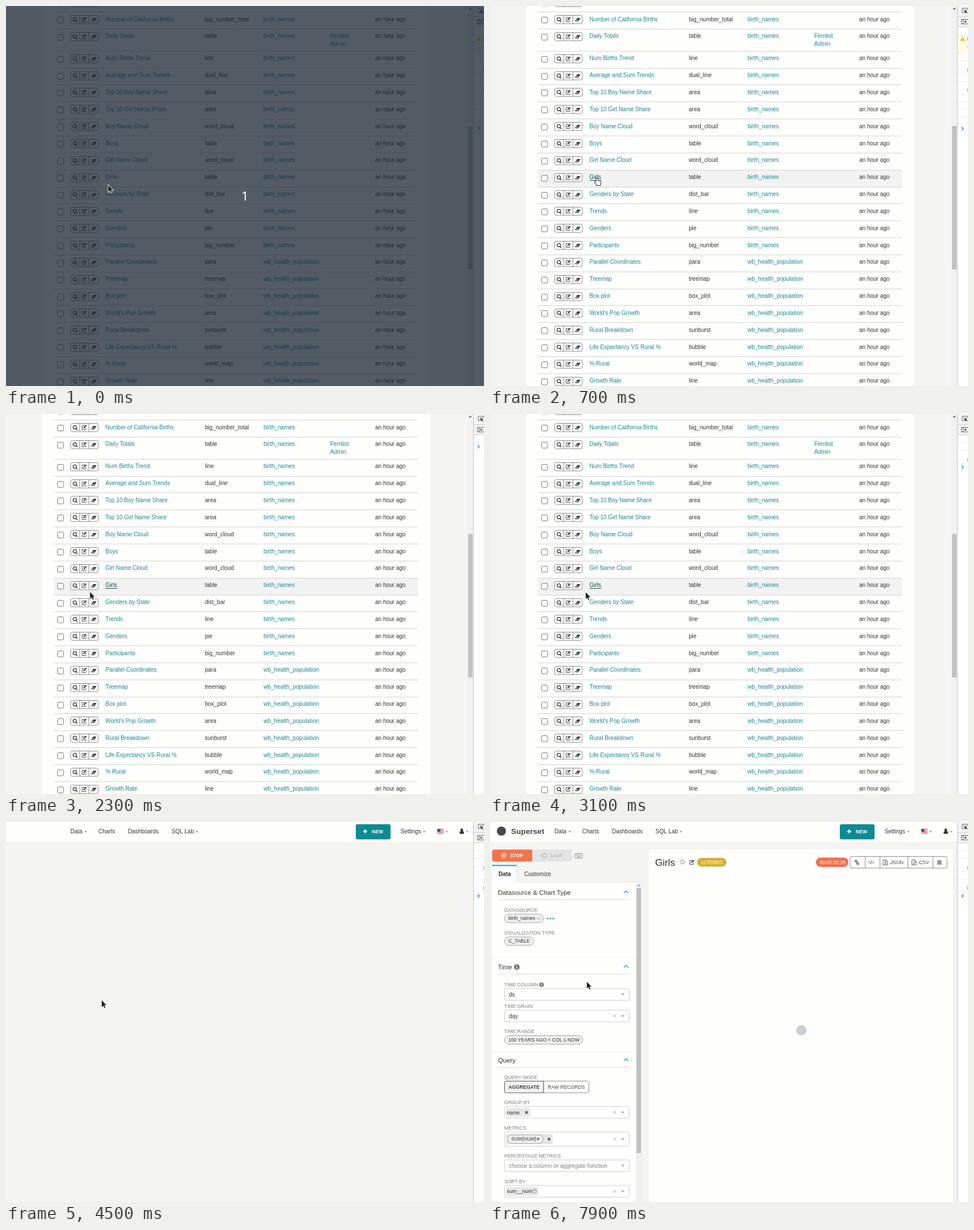
Write an HTML page with a canvas that moves like this. It is 839x668 px and loops after 8 s.

```html
<!DOCTYPE html>
<html lang="en">
<head>
<meta charset="utf-8">
<title>Chart list to explore view</title>
<style>
html, body { margin: 0; width: 100%; height: 100%; overflow: hidden; background: #fff; }
canvas { display: block; }
</style>
</head>
<body>
<canvas id="stage" width="839" height="668"></canvas>
<script>
const ctx = document.getElementById('stage').getContext('2d');
const LOOP = 8000, SANS = '"Liberation Sans", Arial, sans-serif';
const INK = '#333', TEAL = '#1f858f', BRIGHT = '#1fa8b8', WHITE = '#fefefd', PAGE = '#f4f4f3', MUTED = '#7d7d7d';
const SMALL = 8.57;

function text(str, x, y, color = INK, size = 10, weight = '') {
  ctx.font = `${weight} ${size}px ${SANS}`;
  ctx.fillStyle = color;
  ctx.fillText(str, x, y + size * .35);
}
function rect(x, y, w, h, fill) {
  ctx.fillStyle = fill;
  ctx.fillRect(x, y, w, h);
}
function box(x, y, w, h, r, fill, stroke, width = 1) {
  ctx.beginPath();
  ctx.roundRect(x, y, w, h, r);
  if (fill) { ctx.fillStyle = fill; ctx.fill(); }
  if (stroke) { ctx.strokeStyle = stroke; ctx.lineWidth = width; ctx.stroke(); }
}
function dot(x, y, r, fill) {
  ctx.beginPath();
  ctx.arc(x, y, r, 0, 7);
  ctx.fillStyle = fill;
  ctx.fill();
}
// Path data drawn relative to (x, y).
function path(d, x, y, { fill, stroke, width = 1 }) {
  const p = new Path2D(d);
  ctx.save();
  ctx.translate(x, y);
  if (stroke) { ctx.strokeStyle = stroke; ctx.lineWidth = width; ctx.stroke(p); }
  if (fill) { ctx.fillStyle = fill; ctx.fill(p); }
  ctx.restore();
}
const caret = (x, y, s = 3, color = '#aaa') => path(`M${-s} ${-s / 2}H${s}L0 ${s / 2 + .5}Z`, x, y, { fill: color });
const pencil = (x, y) => {
  path('M2 -3.5H-3.5V3.5H3V1', x, y, { stroke: '#555' });
  path('M-1.5 1.5L-1 -.5L3.2 -4.4L4.7 -3L.5 1Z', x, y, { fill: '#444' });
};
const mix = (a, b, f) => `rgb(${a.map((v, i) => Math.round(v + (b[i] - v) * f))})`;
// Latest entry whose start time has been reached.
const at = (keys, t) => keys.findLast(k => k[0] <= t);

// ---- chart list ----
const BIRTHS = 'birth_names', HEALTH = 'wb_health_population';
const charts = [
  ['', ''], ['Number of California Births', 'big_number_total'], ['Daily Totals', 'table'],
  ['Num Births Trend', 'line'], ['Average and Sum Trends', 'dual_line'],
  ['Top 10 Boy Name Share', 'area'], ['Top 10 Girl Name Share', 'area'],
  ['Boy Name Cloud', 'word_cloud'], ['Boys', 'table'], ['Girl Name Cloud', 'word_cloud'],
  ['Girls', 'table'], ['Genders by State', 'dist_bar'], ['Trends', 'line'], ['Genders', 'pie'],
  ['Participants', 'big_number'], ['Parallel Coordinates', 'para'], ['Treemap', 'treemap'],
  ['Box plot', 'box_plot'], ["World's Pop Growth", 'area'], ['Rural Breakdown', 'sunburst'],
  ['Life Expectancy VS Rural %', 'bubble'], ['% Rural', 'world_map'], ['Growth Rate', 'line'],
];

function rowTools(y) {
  box(90.5, y - 3.5, 10.5, 10.5, 2, '#fff', '#777');
  box(113.5, y - 6.5, 48.5, 14.5, 3, '#fff', '#8c8c8c');
  rect(129, y - 6, 1, 14, '#8c8c8c');
  rect(145, y - 6, 1, 14, '#8c8c8c');
  path('M2.4 -.6A3 3 0 1 1 -3.6 -.6A3 3 0 1 1 2.4 -.6M1.5 1.6L4 4.2', 121.3, y + 1, { stroke: '#333', width: 1.4 });
  pencil(137, y + 1);
  path('M-5 3L-1 -3H5L1 3Z', 154, y + 1, { fill: '#444' });
  path('M-3 1.8L-2 .4H.8L-.2 1.8Z', 154, y + 1, { fill: '#fff' });
}

function chartList(t) {
  rect(0, 0, 821, 668, PAGE);
  rect(63, 0, 682, 668, WHITE);
  charts.forEach(([name, type], i) => {
    const y = i < 3 ? 23 + (i - 1) * 29.9 : 91.8 + (i - 3) * 29.84;
    const top = Math.round(y - 13);
    const girls = name === 'Girls';
    if (girls && t >= 100) rect(84, top, 639, 30, '#f2f2f2');
    rect(84, top, 639, 1, '#d3d3d3');
    rowTools(Math.round(y));
    if (!name) return;
    const focused = girls && t >= 600;
    text(name, 174.5, y, focused ? '#10484e' : TEAL);
    if (focused) rect(174.5, Math.round(y + 5), 20.5, 1, '#10484e');
    text(type, 349, y);
    text(i < 15 ? BIRTHS : HEALTH, 452, y, TEAL);
    if (i === 2) {
      text('Fernlist', 569, y, TEAL);
      text('Admin', 569, y + 13.5, TEAL);
    }
    text('an hour ago', 648, y);
  });
  rect(810, 0, 10, 668, '#f1f1f1');
  rect(811, 211, 8, 252, '#c1c1c1');
  path('M-2.5 1.5H2.5L0 -1.5Z', 815, 4.5, { fill: '#555' });
}

// ---- console strip ----
// start, prompt y, separators, clipped message marks
const consoleStates = [
  [0, 215.5, [50, 83, 96, 119, 132, 155, 168, 181, 194, 207], [58, 112, 148]],
  [1600, 44, [], []],
  [2100, 57.5, [50], []],
  [3000, 71, [50, 64], []],
  [3100, 93.5, [50, 64, 86], [80]],
  [4300, 106.5, [50, 64, 86, 100], [80]],
  [4500, 130, [50, 64, 86, 100, 122], [80, 116]],
];

function consoleStrip(t) {
  const [start, prompt, lines, marks] = at(consoleStates, t);
  rect(820, 0, 19, 668, '#fff');
  rect(821, 0, 18, 37, '#f3f3f3');
  if (!start) {
    rect(821, 50, 18, 33, '#fffbe3');
    path('M0 -4L4.3 3.7H-4.3Z', 829.5, 57.5, { fill: '#e8b62c' });
    rect(829, 56, 1, 3, '#fff');
    rect(838, 71, 1, 2, '#d9a93a');
  }
  lines.forEach(y => rect(821, y, 18, 1, '#ededed'));
  marks.forEach(y => rect(838, y - 3, 1, 6, '#999'));
  rect(821, 18, 18, 1, '#ccc');
  rect(821, 36, 18, 1, '#ccc');
  rect(820, 0, 1, 668, '#c4c4c4');
  path('M3 3.5H-4V-4H5V-1', 833, 8, { stroke: '#666' });
  path('M-1 -1L5 1.4L2.8 2.4L5.5 5L4.6 5.8L2 3.2L1 5Z', 833, 7.5, { fill: '#444' });
  box(827.5, 23.5, 12, 8, 0, null, '#666');
  rect(830, 24, 1, 8, '#666');
  path('M0 -2.5L4 0L0 2.5Z', 833, 27.5, { fill: '#555' });
  path('M-1.6 -2.8L1.3 0L-1.6 2.8', 829.5, prompt, { stroke: '#3b7fd0', width: 1.4 });
}

// ---- explore view ----
function navBar() {
  rect(0, 0, 820, 668, PAGE);
  rect(0, 0, 820, 35, WHITE);
  [['Data', 113, 140], ['Charts', 162], ['Dashboards', 214], ['SQL Lab', 290.5, 335], ['Settings', 692.5, 734]]
    .forEach(([label, x, arrow]) => {
      text(label, x, 16.5);
      if (arrow) caret(arrow, 17, 2.3, '#999');
    });
  box(614, 4, 61, 26.5, 3, '#0d8b93');
  path('M-3.5 0H3.5M0 -3.5V3.5', 630.5, 16.5, { stroke: '#fff', width: 2 });
  text('NEW', 642, 16.8, '#fff', SMALL, 'bold');
  for (let i = 0; i < 7; i++) rect(757, 12 + i * 1.2, 11, 1.2, i % 2 ? '#f6e5e5' : '#cf5560');
  rect(757, 12, 5.5, 4.8, '#454a82');
  caret(773.5, 17, 2.3, '#999');
  dot(800, 14, 2.4, INK);
  box(796.2, 16, 7.6, 4.8, [2.4, 2.4, 1, 1], INK);
  caret(809.5, 17, 2.3, '#999');
}

function section(title, y) {
  text(title, 14, y, INK, 11.4);
  path('M-4 2L0 -2L4 2', 239, y - 1, { stroke: BRIGHT, width: 1.4 });
  rect(14, y + 12, 231, 1, '#ddd');
}
const label = (str, y) => text(str, 25, y, MUTED, SMALL);
function pill(str, x, y, w) {
  box(x + .5, y - 7.5, w - 1, 15, 7.5, '#eee', '#a5a5a5');
  text(str, x + 7.2, y, INK, SMALL);
}
function select(y, value, color = INK, h = 20.5, clear = true) {
  box(25.5, y - h / 2, 219, h, 2.5, '#fff', '#ccc');
  text(value, 33, y, color);
  if (clear) text('×', 216, y, '#aaa');
  caret(233, y);
}
function chip(y, w, h) { box(28, y - h / 2, w, h, 1.5, '#e6e6e6'); }
function info(x, y, r) {
  dot(x, y, r, '#777');
  rect(x - .6, y - r * .6, 1.3, 1.3, '#fff');
  rect(x - .6, y - .5, 1.3, r * .7, '#fff');
}
const remove = (x, y) => path('M-2 -2L2 2M2 -2L-2 2', x, y, { stroke: INK, width: 1.5 });

function runButtons(t) {
  const step = Math.min(1, .34 + Math.floor((t - 7300) / 100) * .22);
  const late = Math.max(0, (step - .34) / .66);
  const stopText = mix([105, 160, 160], [255, 255, 255], late);
  const saveText = mix([70, 155, 165], [190, 190, 190], late);
  const edge = late < 1 ? `rgba(31,133,143,${.75 * (1 - late)})` : null;
  box(4, 48.5, 70, 21, [3, 0, 0, 3], mix([254, 254, 253], [244, 115, 76], step), edge);
  box(74, 48.5, 70, 21, [0, 3, 3, 0], mix([254, 254, 253], [228, 228, 228], late), edge);
  path('M4 0A4 4 0 1 1 -4 0A4 4 0 1 1 4 0', 24, 59, { stroke: stopText, width: 1.3 });
  rect(22.5, 57.5, 3, 3, stopText);
  text('STOP', 35, 59, stopText, SMALL, 'bold');
  dot(95, 59, 4.6, saveText);
  path('M-2.5 0H2.5M0 -2.5V2.5', 95, 59, { stroke: '#fff', width: 1.4 });
  text('SAVE', 104.8, 59, saveText, SMALL, 'bold');
  box(149, 55.5, 13, 8, 1, '#fff', '#888');
  for (let i = 0; i < 4; i++) rect(151 + i * 2.5, 57.5, 1.5, 1.5, '#777');
  rect(152, 60.5, 7, 1.2, '#777');
}

function controls() {
  rect(4, 105, 252, 563, WHITE);
  rect(4, 105, 262, 1, '#e0e0e0');
  rect(4, 76, 43, 30, WHITE);
  rect(4, 75.5, 43, 2, BRIGHT);
  rect(46.5, 77, 1, 28, '#ddd');
  text('Data', 15, 91, INK, 10, 'bold');
  text('Customize', 60, 91);
  rect(256, 106, 10, 562, '#f1f1f1');
  rect(257, 116, 8, 466, '#c1c1c1');
  path('M-2.5 1.5H2.5L0 -1.5Z', 261, 111, { fill: '#888' });
  [237, 402].forEach(y => rect(4, y, 252, 4, '#fafafa'));

  section('Datasource & Chart Type', 124);
  label('DATASOURCE', 155);
  pill('birth_names', 25, 169.5, 69);
  path('M-2 -1L0 1L2 -1', 85, 170, { stroke: '#888' });
  [101, 106, 111].forEach(x => dot(x, 169.8, 1.5, BRIGHT));
  label('VISUALIZATION TYPE', 195);
  pill('C_TABLE', 25, 209.5, 52);

  section('Time', 255);
  info(47, 255, 5);
  label('TIME COLUMN', 286);
  info(90.5, 286, 4);
  select(303, 'ds', INK, 20.5, false);
  label('TIME GRAIN', 324);
  select(341, 'day');
  label('TIME RANGE', 368.5);
  pill('100 YEARS AGO < COL ≤ NOW', 25, 383, 138);

  section('Query', 419);
  label('QUERY MODE', 449);
  box(94, 455.5, 79.5, 20.5, [0, 3, 3, 0], '#fff', '#8c8c8c');
  box(25.5, 455.5, 68.5, 20.5, [3, 0, 0, 3], '#f1f1f1', '#555');
  text('AGGREGATE', 32.5, 465.7, '#444', SMALL, 'bold');
  text('RAW RECORDS', 101.5, 465.7, '#444', SMALL);
  label('GROUP BY', 493.5);
  select(510.5, '');
  chip(510.5, 43, 15);
  text('name', 29.5, 510.5, INK, 9);
  remove(64, 510.5);
  label('METRICS', 538);
  select(557.5, '', INK, 25);
  chip(557.5, 82, 18);
  pill('SUM(NUM)', 30, 557.5, 64);
  path('M-1.5 -2.8L1.8 0L-1.5 2.8Z', 85, 557.3, { fill: INK });
  remove(103.5, 557.5);
  label('PERCENTAGE METRICS', 587);
  select(604.3, 'choose a column or aggregate function', '#808080', 20.5, false);
  label('SORT BY', 632);
  select(649.2, '');
  chip(649.2, 57, 15);
  text('sum__num', 29.5, 649.2, INK, 9);
  path('M3.7 0A3.7 3.7 0 1 1 -3.7 0A3.7 3.7 0 1 1 3.7 0', 78, 649, { stroke: '#888', width: .8 });
  text('?', 76.2, 649, '#777', 6.5);
}

function chartCard(t) {
  box(279, 48, 534, 630, 3, WHITE);
  text('Girls', 289.7, 71, INK, 17.1);
  path('M0 -4.5L1.3 -1.5L4.6 -1.3L2 .8L2.9 4L0 2.2L-2.9 4L-2 .8L-4.6 -1.3L-1.3 -1.5Z', 337.8, 70.3, { stroke: '#999' });
  pencil(354, 71);
  box(363.5, 63, 51.5, 15.5, 7.7, '#d8ae33');
  text('ALTERED', 369.8, 71, '#fff', SMALL);

  box(632, 60.5, 170, 20.5, 3, '#fff', '#8c8c8c');
  [658, 684, 733, 777].forEach(x => rect(x, 61, 1, 20, '#8c8c8c'));
  path('M-.5 .5L-3 -2Q-3 -4 -1 -3.5L1 -1.5M.5 -.5L3 2Q3 4 1 3.5L-1 1.5', 644, 71, { stroke: '#444', width: 1.3 });
  path('M-2 -2.5L-4.5 0L-2 2.5M2 -2.5L4.5 0L2 2.5M.8 -3L-.8 3', 669, 71, { stroke: '#555' });
  [[690, '.JSON'], [740.5, '.CSV']].forEach(([x, name]) => {
    path('M0 -4.5H4.5L7.5 -1.5V4.5H0ZM4.5 -4.5V-1.5H7.5M2 .5H5.5M2 2.5H5.5', x, 71, { stroke: '#555', width: .9 });
    text(name, x + 10, 71, '#444', SMALL + .2);
  });
  [68, 70.5, 73].forEach(y => rect(785, y, 7.5, 1.3, INK));

  if (t < 7600) return;
  const hundredths = t < 7800 ? '00' : t < 7900 ? '19' : '29';
  box(572, 62.5, 57, 16.5, 8.2, '#f0714c');
  text('00:00:00.' + hundredths, 578.7, 71, '#fff', SMALL);
  dot(546.5, 366, 9, '#c8d0d5');
}

function explore(t) {
  navBar();
  if (t < 7300) return;
  dot(20, 16, 8, '#484848');
  text('Superset', 37, 16.5, '#484848', 13.6, 'bold');
  runButtons(t);
  controls();
  chartCard(t);
}

// ---- pointer ----
const ARROW = 'M0 0V11.8L2.7 9.3L4.5 13.4L6.3 12.6L4.5 8.6H8.2Z';
const HAND = 'M3 6V1.2Q4 -.2 5 1.2V4.5L9.5 5.5Q11 6 10.8 8L10 13H4L.6 8.2Q0 6.6 1.6 6.8L3 8Z';
const pointer = [
  [0, 179.5, 315], [300, 179.5, 307], [600, 184, 301], [700, 183.5, 302, true], [1100, 183.5, 300.5, true],
  [1700, 184, 302, true], [1800, 183.5, 302.5, true], [2000, 178, 305], [2100, 165, 310],
  [2200, 152, 313], [2300, 147.5, 313], [2500, 168, 313.5], [7800, 169, 296], [7900, 170, 281],
];
function drawPointer(t) {
  const [, x, y, hand] = at(pointer, t);
  if (hand) path(HAND, x, y, { fill: '#fff', stroke: '#222', width: 1.8 });
  else path(ARROW, x, y, { fill: '#1c1c1c', stroke: '#fff', width: 1.6 });
}

function render(t) {
  if (t < 3500) chartList(t);
  else explore(t);
  consoleStrip(t);
  if (t < 100) {
    rect(0, 0, 839, 668, 'rgba(26,37,50,.75)');
    ctx.font = '22px "Noto Sans", sans-serif';
    ctx.fillStyle = '#fff';
    ctx.fillText('1', 413, 341.5);
  }
  drawPointer(t);
}

const begin = performance.now();
function tick() {
  render((performance.now() - begin) % LOOP);
  requestAnimationFrame(tick);
}
tick();
</script>
</body>
</html>
```
